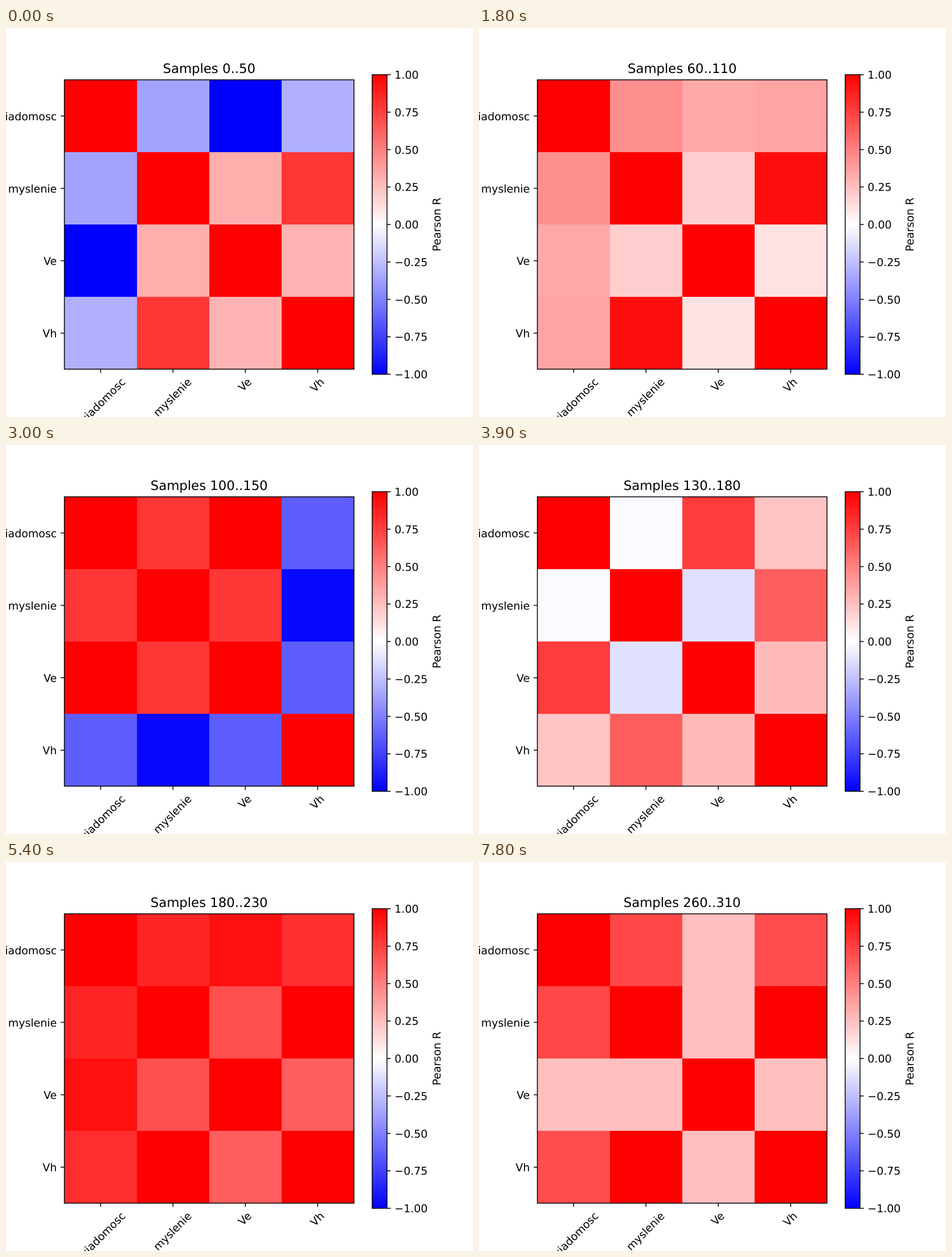
Animation, 820 px wide and 683 px high, one loop 8 s. Source, as an HTML page:

```html
<!DOCTYPE html>
<html lang="pl">
<head>
<meta charset="utf-8">
<title>Correlation heatmap</title>
<style>
  html, body { margin: 0; width: 100%; height: 100%; overflow: hidden; background: #fff; }
  svg { display: block; width: 820px; height: 683px; }
  text { font: 18.98px "DejaVu Sans", sans-serif; fill: #000; text-rendering: geometricPrecision; }
  #title { font-size: 22.78px; }
  .mid { text-anchor: middle; }
  .end { text-anchor: end; }
  .line { fill: none; stroke: #000; stroke-width: 1.5; }
  #cells { shape-rendering: crispEdges; }
</style>
</head>
<body>
<svg viewBox="0 0 820 683">
  <defs>
    <linearGradient id="bwr" x1="0" y1="0" x2="0" y2="1">
      <stop offset="0" stop-color="#f00"/>
      <stop offset=".5" stop-color="#fff"/>
      <stop offset="1" stop-color="#00f"/>
    </linearGradient>
  </defs>
  <text id="title" class="mid" x="356.7" y="79.3"></text>
  <g id="cells"></g>
  <rect class="line" x="102.5" y="91" width="508.5" height="508"/>
  <rect class="line" x="643" y="82" width="26" height="526" style="fill:url(#bwr)"/>
  <g id="axes"></g>
  <text class="mid" transform="translate(763.3 345) rotate(-90)">Pearson R</text>
</svg>
<script>
const LEFT = 102.5, TOP = 90.9, CELL = 127.1, TICK = 6.6;
const STEP = 300, LOOP = 8000;
const names = ["swiadomosc", "myslenie", "Ve", "Vh"];

// key points: window index, then the upper triangle of the matrix row by row
const keys = [
  [0, -.36, -1, -.31, .32, .79, .3],
  [6, .44, .34, .36, .19, .95, .11],
  [10, .79, 1, -.63, .79, -.97, -.63],
  [13, -.02, .77, .23, -.12, .63, .27],
  [18, .86, .94, .82, .69, 1, .63],
  [23, .66, 1, .7, .69, 1, .72],
  [26, .72, .25, .7, .25, 1, .25]
];

const byId = id => document.getElementById(id);
const title = byId("title"), cells = byId("cells"), axes = byId("axes");

function add(parent, tag, attrs, text = "") {
  const el = document.createElementNS("http://www.w3.org/2000/svg", tag);
  for (const name in attrs) el.setAttribute(name, attrs[name]);
  el.textContent = text;
  parent.append(el);
  return el;
}

const tick = d => add(axes, "path", { class: "line", d });

function bwr(v) {
  const fade = Math.round(255 * (1 - Math.abs(v)));
  return v < 0 ? `rgb(${fade},${fade},255)` : `rgb(255,${fade},${fade})`;
}

const grid = names.map((_, row) => names.map((_, col) => add(cells, "rect", {
  x: LEFT + col * CELL, y: TOP + row * CELL, width: CELL, height: CELL, fill: "#f00"
})));

names.forEach((name, i) => {
  const x = LEFT + (i + .5) * CELL, y = TOP + (i + .5) * CELL;
  tick(`M${x} 599v${TICK}`);
  tick(`M${LEFT} ${y}h${-TICK}`);
  add(axes, "text", { class: "end", x: 89.2, y: y + 7.2 }, name);
  // centre the slanted label's box under its tick
  const label = add(axes, "text", { class: "end" }, name);
  const end = x + (label.getComputedTextLength() + 10.5) / Math.sqrt(8);
  label.setAttribute("transform", `translate(${end} 622.7) rotate(-45)`);
});

for (let i = 0; i <= 8; i++) {
  const y = 82 + i * 65.75, v = 1 - i / 4;
  tick(`M669 ${y}h${TICK}`);
  add(axes, "text", { x: 682.3, y: y + 7.2 }, v.toFixed(2).replace("-", "\u2212"));
}

function draw(step) {
  title.textContent = `Samples ${step * 10}..${step * 10 + 50}`;
  const next = Math.max(1, keys.findIndex(k => k[0] >= step));
  const a = keys[next - 1], b = keys[next];
  const mix = (step - a[0]) / (b[0] - a[0]);
  let i = 1;
  for (let row = 0; row < 3; row++) {
    for (let col = row + 1; col < 4; col++, i++) {
      const color = bwr(a[i] + (b[i] - a[i]) * mix);
      grid[row][col].setAttribute("fill", color);
      grid[col][row].setAttribute("fill", color);
    }
  }
}

const start = performance.now();
let shown = -1;

function frame() {
  const step = Math.floor((performance.now() - start) % LOOP / STEP);
  if (step !== shown) draw(shown = step);
  requestAnimationFrame(frame);
}
frame();
</script>
</body>
</html>
```
